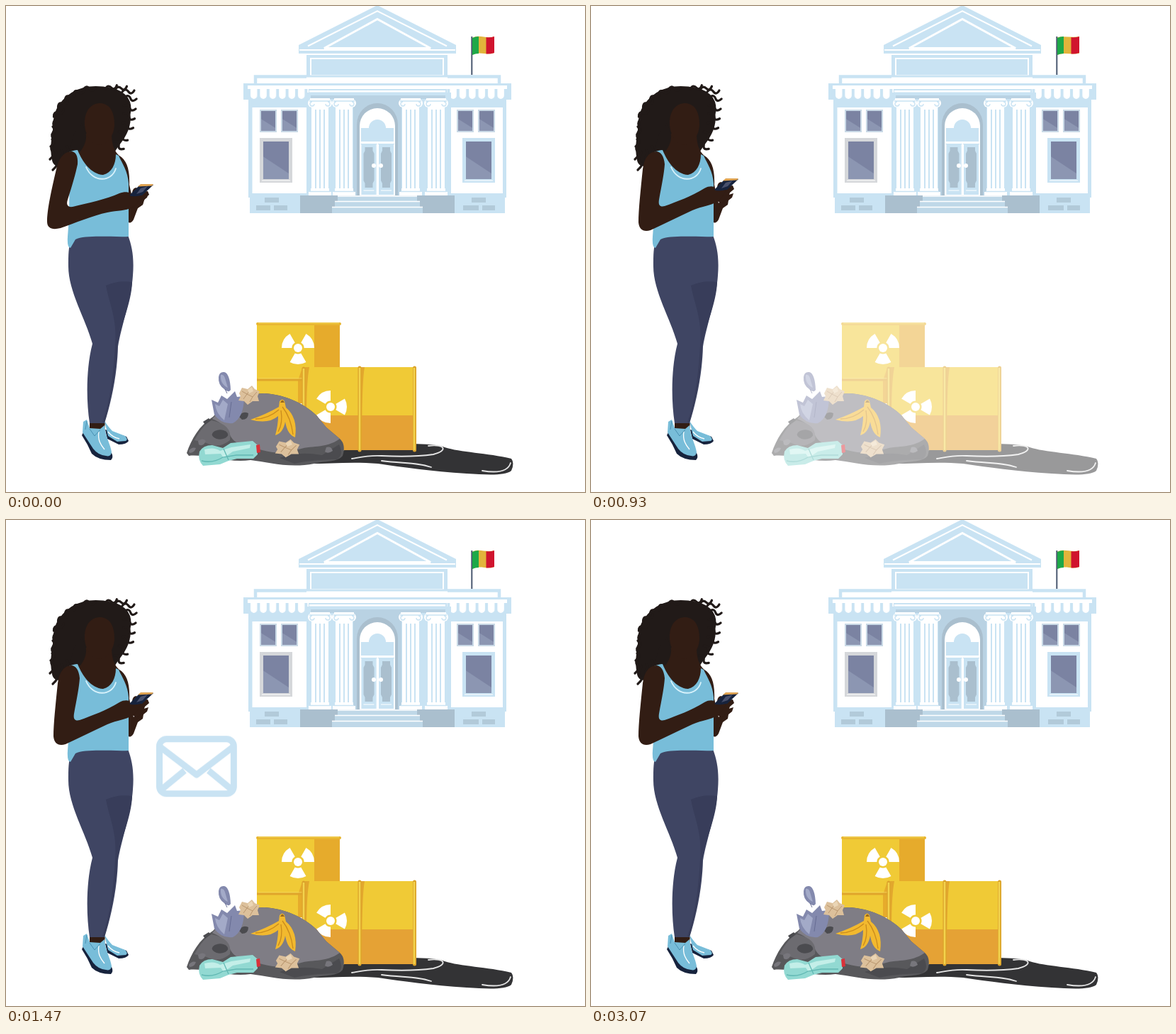
Recreate the animation shown at these times as an HTML page without scripts. Size 817x685 px, loop 3.27 s.

```html
<!DOCTYPE html>
<html lang="en">
<head>
<meta charset="utf-8">
<title>Report by phone</title>
<style>
html, body { margin: 0; width: 100%; height: 100%; overflow: hidden; background: #fff; }
svg { display: block; width: 100%; height: 100%; }
.sky { fill: #c9e3f3; }
.sky-line { fill: none; stroke: #c9e3f3; }
.white { fill: #fff; }
.white-line { fill: none; stroke: #fff; }
.slate { fill: #aabfce; }
.skin { fill: #321d14; }
.top { fill: #78bdd9; }
.navy { fill: #17233d; }
.hair { fill: #211a18; }
.curl { fill: none; stroke: #211a18; stroke-width: 3.2; stroke-linecap: round; }
.waste { animation: fade 3.27s linear infinite; }
.phone { animation: lift 3.27s linear infinite; }
.mail { animation: fly 3.27s linear infinite; }
@keyframes fade {
  0%, 20.4% { opacity: 1; }
  28.44% { opacity: .5; }
  34.5% { opacity: .24; }
  36.7% { opacity: .29; }
  44.6%, 100% { opacity: 1; }
}
@keyframes lift {
  0% { transform: none; }
  23%, 100% { transform: translateY(-8px); }
}
@keyframes fly {
  0%, 38.5% { transform: translate(190px, 260px) scale(0); }
  44.95% { transform: translate(268.5px, 347px) scale(1); }
  51.07% { transform: translate(341px, 380px) scale(.77); }
  57.19% { transform: translate(415px, 379px) scale(.54); }
  62.08% { transform: translate(474px, 335px) scale(.35); }
  66.27% { transform: translate(524px, 235px) scale(.18); }
  66.3%, 100% { transform: translate(524px, 235px) scale(0); }
}
</style>
</head>
<body>
<svg viewBox="0 0 817 685" preserveAspectRatio="none">
<defs>
  <pattern id="tongues" x="343" y="116" width="13.4" height="18" patternUnits="userSpaceOnUse">
    <path class="white" d="M2 0V10a4.700 5 0 0 0 9.400 0V0z"/>
  </pattern>
  <g id="column">
    <path class="white" d="M-12 136H12V260H-12z"/>
    <path class="sky-line" stroke-width="2" d="M-6 146V258M0 146V258M6 146V258"/>
    <path class="white" d="M-14 130H14V142H-14zM-13 257H13V261H-13zM-16 262H16V267H-16z"/>
    <circle class="white" cx="-11" cy="137" r="6"/>
    <circle class="white" cx="11" cy="137" r="6"/>
    <path class="sky-line" stroke-width="1.300" d="M-15 134H15M-8 138a3 3 0 1 1-3-3M8 138a3 3 0 1 0 3-3M-14 261.500H14"/>
  </g>
  <g id="pane">
    <path fill="#7b83a2" d="M0 0H1V1H0z"/>
    <path fill="#8c96b2" d="M0 .4L1 .85V1H0z"/>
  </g>
  <g id="small">
    <path fill="#c9d9e6" d="M0 0H24V32H0z"/>
    <use href="#pane" transform="translate(2 2) scale(20 28)"/>
  </g>
  <g id="trefoil">
    <circle class="white-line" r="15.800" stroke-width="14.400" pathLength="6" stroke-dasharray="1" stroke-dashoffset="1"/>
    <circle class="white" r="6"/>
  </g>
  <g id="paper">
    <path fill="#dcc09b" d="M-14-2L-10-10-2-8 4-13 8-8 15-5 12 2 14 9 5 9-2 14-7 9-15 8-12 2z"/>
    <path fill="none" stroke="#b99770" d="M-10-5L-3-1 3-8M-3-1L-8 6M-3-1L5 3 11-4M5 3L1 10"/>
    <path fill="#ead5b5" d="M-2-7L4-11 6-5 0-2z"/>
  </g>
  <path id="curl" class="curl" d="M-6 0C-2-5 1-3 3 0S8 3 11-2"/>
  <path id="lock" class="curl" d="M0-14C6-8-5-4 0 2S1 10-3 14"/>
  <g id="door">
    <path class="sky" d="M0 194H23V266H0z"/>
    <path class="slate" d="M6 199H17V204L19 208V246L17 250V256H6V250L4 246V208L6 204z"/>
    <path class="white-line" d="M.5 195V266M22.500 195V266M4 260H19"/>
  </g>
</defs>

<g id="hall">
  <path class="sky" d="M413 55L524-1 635 55V67H413z"/>
  <path class="white-line" stroke-width="2" d="M414 62H634M426 56.500L524 7 622 56.500"/>
  <path class="white-line" stroke-width="3" d="M449 59.500L524 18.500 599 59.500z"/>
  <path class="sky" d="M424 69H623V99H424z"/>
  <path class="white-line" stroke-width="2" d="M430 74H617V98H430z"/>
  <path class="white" d="M347 110H704V266H347z"/>
  <path class="sky-line" stroke-width="4.500" d="M352 113V99.500H424M623 99.500H696V113"/>
  <path class="sky-line" stroke-width="3" d="M424 99H623"/>
  <path class="sky" d="M335 109H713V132H706V143H342V132H335z"/>
  <path class="white" d="M341 112H707V117H341z"/>
  <path fill="url(#tongues)" d="M343 116H427V134H343zM622 116H705V134H622z"/>
  <path class="sky" d="M342 130H347.500V267H342zM701 130H706V267H701z"/>

  <path class="sky" d="M424 122H628V267H424z"/>
  <path class="white" d="M428 119H620V121.500H428z"/>
  <path fill="#b9d2e3" d="M430 126H620V131H430zM490 130H558V267H490z"/>
  <path class="sky" d="M426 147H430V266H426zM621 147H626V266H621z"/>
  <use href="#column" x="443"/>
  <use href="#column" x="477"/>
  <use href="#column" x="571"/>
  <use href="#column" x="607"/>

  <path class="slate" d="M495 267V167a29 30 0 0 1 58 0V267z"/>
  <path class="white" d="M499 267V169a25 25 0 0 1 50 0V267z"/>
  <path class="sky" d="M501 191V172H512a12 12 0 0 1 24 0H547V191z"/>
  <use href="#door" x="500.500"/>
  <use href="#door" x="525"/>
  <circle class="white" cx="519" cy="225" r="3"/>
  <circle class="white" cx="529" cy="225" r="3"/>

  <use href="#small" x="358" y="146"/>
  <use href="#small" x="388" y="146"/>
  <use href="#small" x="636" y="146"/>
  <use href="#small" x="666" y="146"/>
  <path fill="#d5d7da" d="M358 186H404V249H358z"/>
  <path class="sky" d="M644 186H690V249H644z"/>
  <use href="#pane" transform="translate(363 191) scale(36 53)"/>
  <use href="#pane" transform="translate(649 191) scale(36 53)"/>
  <path class="white-line" stroke-width="1.200" d="M361 246H401M647 246H687"/>

  <path class="sky" d="M342 264H424V267H415V292H344V270H342zM628 264H706V270H704V292H633V267H628z"/>
  <path fill="#b2cad9" d="M365 270H385V277H365zM353 281H373V288H353zM378 281H397V288H378zM657 270H677V277H657zM645 281H667V288H645zM672 281H690V288H672z"/>
  <path class="slate" d="M415 267H633V292H415z"/>
  <path fill="#bfd8e8" d="M468 267H580V275H584V283H588V292H460V283H464V275H468z"/>
  <path class="white-line" stroke-width="1.500" d="M468 268H580M464 275.500H584M460 283.500H588"/>
</g>

<g id="flag">
  <path stroke="#4a5870" stroke-width="2" d="M657.300 43V97"/>
  <path fill="#e2b43b" d="M658 45C668 39 678 47 689 43V66C678 70 668 63 658 69z">
    <animate attributeName="d" dur="1.635s" repeatCount="indefinite" keyTimes="0;.5;1" values="M658 45C668 39 678 47 689 43V66C678 70 668 63 658 69z;M658 44C668 42 678 45 689 43V67C678 69 668 65 658 69z;M658 45C668 39 678 47 689 43V66C678 70 668 63 658 69z"/>
  </path>
  <path fill="#1ea848" d="M658 45Q662 43 667 43V67Q662 67 658 69z"/>
  <path fill="#d0142e" d="M677.500 44Q683 45 689 43V66Q683 68 677.500 67.500z"/>
</g>

<g class="waste">
  <path fill="#333335" d="M425 645C460 635 480 620 520 618 560 618 600 615 619 622 640 629 680 630 713 638Q718 644 713 655C705 662 680 661 650 659 600 656 560 650 525 645 490 642 460 645 425 645z"/>
  <path fill="none" stroke="#e5e5e5" stroke-width="1.800" stroke-linecap="round" d="M596 620C620 617 624 627 603 632 575 636 550 635 530 634 510 633 500 636 488 638M530 641C560 645 580 643 600 650M672 655C690 658 708 658 712 644"/>

  <path fill="#f0ca36" d="M354 449H471V560H354z"/>
  <path fill="#e6ab2c" d="M435 449H471V510H435zM418 510V560H412V528z"/>
  <path stroke="#e8b52f" stroke-width="4" stroke-linecap="round" d="M355 448H471"/>
  <path stroke="#f5da62" d="M356 447H470M356 525H420"/>
  <path stroke="#e0a52b" stroke-width="3" d="M354 527H420"/>
  <use href="#trefoil" x="412" y="482"/>

  <path fill="#f0ca36" d="M419 509H578V626H419z"/>
  <path fill="#e5a235" d="M424 577H577V626H424z"/>
  <path fill="#e2a72d" d="M422 509H428Q424 530 424 577H422zM500 509H506Q502 530 502 626H500z"/>
  <path stroke="#dba32b" stroke-width="5" stroke-linecap="round" d="M420 511V625M499 510V626M576.500 510V626"/>
  <path stroke="#f3d34c" stroke-width="2.500" d="M420 511V625M499 510V626M576 510V626"/>
  <use href="#trefoil" transform="translate(458 565) rotate(-90)"/>

  <path fill="#58585b" d="M255 630C262 610 272 592 292 579 310 560 335 546 365 546 395 548 420 560 438 577L452 594 471 610Q480 618 475 634C468 643 450 641 435 645 400 652 370 643 345 640 315 645 280 631 258 634z"/>
  <path fill="#7f7d85" d="M291 582C310 560 335 546 365 546 395 548 420 560 438 577L452 594 471 610C450 625 430 618 410 626 385 635 360 626 335 618 310 615 322 594 291 582z"/>
  <path fill="#6c6b70" d="M266 612Q278 590 290 584 320 590 316 612 300 625 283 616z"/>
  <path fill="#4b4b4f" d="M292 601a10 6 0 1 1 20 6 10 6 0 0 1-20-6zM329 579q4-9 13-5 0 9-9 9zM278 586l8-5 3 3-8 6zM386 637q25-10 60-4l24-15q7 15-3 21-40 1-60 6z"/>
  <path fill="#77767c" d="M271 613q7-5 11 0-4 9-10 5zM258 627q4-6 10-4-2 7-9 7zM452 622q7-2 9 5-7 5-11 1z"/>

  <path fill="#8389ad" d="M300 523Q301 515 308 516 316 518 317 541 314 546 308 540 299 534 300 523zM290 555L299 559 304 549 312 554 323 543 326 551 336 550Q336 580 320 588 304 590 294 576z"/>
  <path fill="#a3aac8" d="M303 520Q308 518 310 528L313 538Q302 533 303 520zM295 561L301 564 306 555 313 561 308 584Q296 574 295 561z"/>
  <path stroke="#676d93" fill="none" d="M309 540L312 546M318 558L315 580"/>

  <use href="#paper" x="343" y="548"/>
  <use href="#paper" transform="translate(397 623) scale(1.150 .95)"/>

  <path fill="#f2b92e" d="M386 557Q390 552 393 557L395 566Q412 580 408 608 397 604 394 586 391 602 380 605 384 590 384 578 370 590 345 583 368 575 385 565z"/>
  <path fill="none" stroke="#c98b1e" stroke-width="1.300" d="M390 565Q402 580 405 604M388 570Q391 588 384 600M385 569Q370 582 352 582"/>
  <path fill="#9a6a1f" d="M387 559Q390 552 393 559z"/>

  <path fill="#92d9d2" d="M273 628Q278 619 291 619L306 623 317 616 348 613 355 619 355 632 349 638 326 638 314 641 302 646 278 648Q270 640 273 628z"/>
  <path fill="#c3eee8" d="M280 625Q294 621 302 627L318 622 345 618 344 623 320 628 307 637 303 631 281 632z"/>
  <path fill="none" stroke="#61b8b3" stroke-width="1.300" d="M276 641Q292 645 306 636L325 633 349 633M307 624L314 640"/>
  <path fill="#d9323a" d="M353 619L358 618 359 629 354 630z"/>
</g>

<g id="woman">
  <path class="hair" stroke="#211a18" stroke-width="3" d="M80 135C95 116 120 111 148 117 170 121 178 136 174 153 176 170 168 184 158 196L150 208 95 210C82 226 67 230 66 214 63 200 66 185 68 172 68 155 71 145 80 135z"/>
  <g>
    <use href="#curl" transform="translate(170 121)"/>
    <use href="#curl" transform="translate(173 130) rotate(15)"/>
    <use href="#curl" transform="translate(172 143) rotate(20)"/>
    <use href="#curl" transform="translate(171 155) rotate(30)"/>
    <use href="#curl" transform="translate(169 168) rotate(30)"/>
    <use href="#curl" transform="translate(160 117) rotate(-10)"/>
    <use href="#curl" transform="translate(146 116) rotate(-12)"/>
    <use href="#curl" transform="translate(163 182) rotate(50)"/>
    <use href="#curl" transform="translate(157 195) rotate(45)"/>
    <use href="#curl" transform="translate(120 116) rotate(180)"/>
    <use href="#curl" transform="translate(105 120) rotate(165)"/>
    <use href="#curl" transform="translate(92 126) rotate(150)"/>
    <use href="#curl" transform="translate(82 136) rotate(150)"/>
    <use href="#curl" transform="translate(76 149) rotate(150)"/>
    <use href="#lock" x="68" y="167"/>
    <use href="#lock" x="66" y="184"/>
    <use href="#lock" x="65" y="202"/>
    <use href="#lock" x="69" y="217"/>
    <use href="#lock" x="78" y="217"/>
    <use href="#lock" x="86" y="212"/>
  </g>
  <path class="skin" d="M112 180H149Q149 202 160 211C170 217 175 230 174 252L180 278 188 268 201 264 199 270 194 274 193 280 186 285 180 301Q176 308 171 304L120 260 80 225Q82 207 99 204 113 201 112 180z"/>
  <path class="skin" d="M111 162C112 145 122 137 133 137 148 138 153 151 153 168 152 184 142 196 131 196 119 195 110 179 111 162z"/>
  <path class="hair" d="M105 205Q116 190 112 177L107 165 96 180 90 203z"/>

  <path class="skin" d="M118 582H140L139 600H118z"/>
  <path fill="#3f4563" d="M92 330C110 321 150 321 172 323 178 339 181 355 179 380 177 412 163 450 158 480 157 520 148 560 139 588H118C113 555 113 510 122 476 112 440 88 402 88 367 88 350 88 340 92 330z"/>
  <path fill="#383d5a" d="M141 394Q158 386 178 389C177 420 161 450 157 480 156 515 148 555 139 587L136 587C149 550 152 510 154 480 157 440 147 425 141 394z"/>

  <path class="top" d="M87 207Q95 203 101 203C108 220 120 237 137 238 149 235 155 223 155 209L159 211C164 222 172 233 173 250V325C150 326 112 322 98 329L91 341Q86 341 87 325C90 290 90 250 87 207z"/>
  <path fill="none" stroke="#d8f2fb" stroke-width="1.800" stroke-linecap="round" d="M113 227C122 249 149 249 155 229"/>

  <path class="navy" d="M140 597L143 610 159 618Q170 618 173 613L170 607z"/>
  <path class="top" d="M139 585Q145 594 150 599L168 606Q173 611 169 613L157 614 144 606z"/>
  <path class="navy" d="M110 599L107 605Q115 617 121 631 130 640 148 640 152 636 149 630z"/>
  <path class="top" d="M109 586L114 583 118 595 133 596 139 591C140 607 148 619 149 629Q148 636 141 634 130 633 123 624L108 601z"/>
  <path class="white-line" stroke-width="1.300" d="M131 600C129 612 134 619 139 625M144 600Q150 608 160 610"/>
  <path fill="none" stroke="#4a91b2" d="M114 585L112 597M118 596L125 606 133 597"/>

  <g class="phone">
    <path class="skin" d="M178 263Q179 256 184 256L188 262 200 261 202 266 196 271 193 280 184 286 174 281z"/>
    <path class="navy" d="M173 268L188 253 208 252 192 267 179 270z"/>
    <path fill="#dfa351" d="M186 254.500L190 251H208L206 253.500z"/>
    <path fill="#48506c" d="M190 257L200 254 193 262 184 265z"/>
  </g>
  <path class="skin" d="M92 205C80 206 74 216 71 230 64 260 58 287 58 304 58 313 65 316 77 313 97 306 123 295 143 291 157 288 170 289 177 284 185 280 187 273 191 267 181 269 173 269 174 265 176 262 167 261 160 264 142 272 115 278 94 283 86 284 85 279 87 273 94 251 98 237 101 223 102 211 98 205 92 205z">
    <animate attributeName="d" dur="3.27s" repeatCount="indefinite" keyTimes="0;.23;1" values="M92 205C80 206 74 216 71 230 64 260 58 287 58 304 58 313 65 316 77 313 97 306 123 295 143 291 157 288 170 289 177 284 185 280 187 273 191 267 181 269 173 269 174 265 176 262 167 261 160 264 142 272 115 278 94 283 86 284 85 279 87 273 94 251 98 237 101 223 102 211 98 205 92 205z;M92 205C80 206 75 216 73 230 70 260 67 287 67 305 68 315 74 319 84 316 104 307 123 297 143 288 157 282 170 281 177 276 185 272 187 265 191 259 181 261 173 261 174 257 176 254 167 253 160 257 142 268 121 276 104 282 96 284 95 279 96 273 100 251 103 237 104 223 103 211 98 205 92 205z;M92 205C80 206 75 216 73 230 70 260 67 287 67 305 68 315 74 319 84 316 104 307 123 297 143 288 157 282 170 281 177 276 185 272 187 265 191 259 181 261 173 261 174 257 176 254 167 253 160 257 142 268 121 276 104 282 96 284 95 279 96 273 100 251 103 237 104 223 103 211 98 205 92 205z"/>
  </path>
</g>

<g class="mail" fill="none" stroke="#c9e3f3" stroke-width="9" stroke-linejoin="round">
  <rect class="white" x="-52.500" y="-38.500" width="105" height="77" rx="10"/>
  <path d="M-51-27L0 12 51-27M-50 33L-17 6M50 33L17 6"/>
</g>
</svg>
</body>
</html>
```
